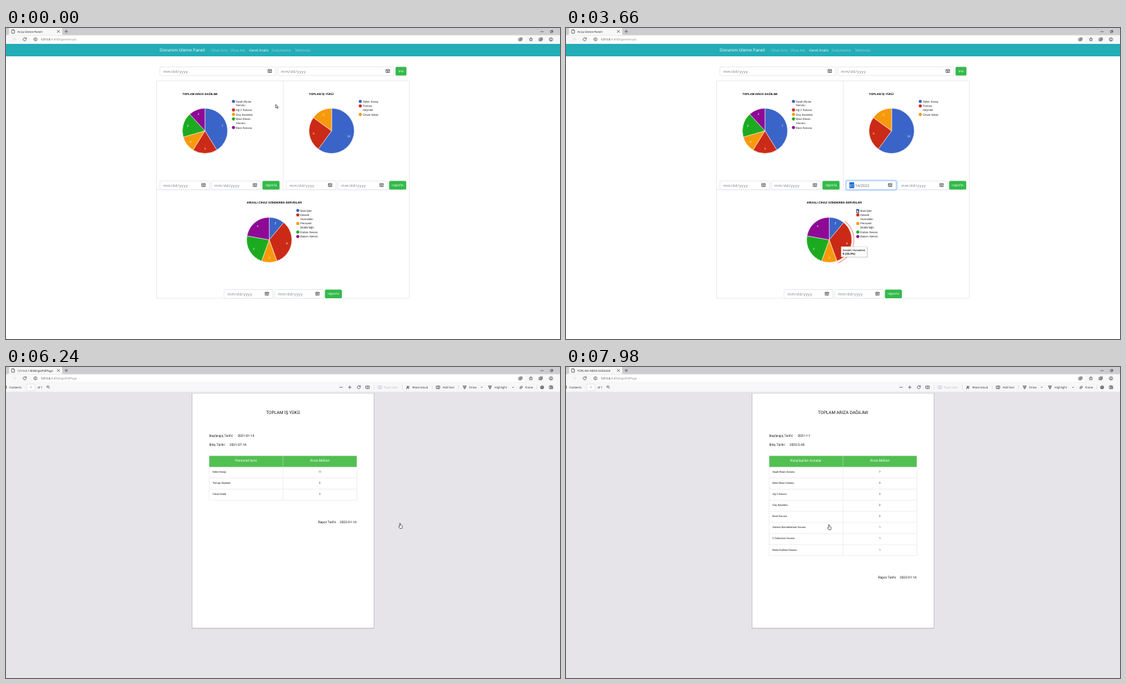
An HTML page for the animation above (8 s loop, 800x450 px).

```html
<!DOCTYPE html>
<html lang="tr">
<head>
<meta charset="utf-8">
<title>Arıza İzleme Paneli</title>
<style>
  html, body { margin: 0; height: 100%; overflow: hidden; background: #fff; }
  svg { display: block; width: 100vw; height: 100vh; text-rendering: geometricPrecision; }
  .ui { font-family: "Open Sans", "Noto Sans", sans-serif; }
  .chart { font-family: "Liberation Sans", Arial, sans-serif; }
  .doc { font-family: Roboto, sans-serif; }
  .ic { fill: none; stroke: #444; stroke-width: .7; stroke-linecap: round; stroke-linejoin: round; }
</style>
</head>
<body>
<svg id="stage" viewBox="0 0 800 450"></svg>
<script>
const LOOP = 8000, STEP = 60;
const COLORS = ['#3a64c8', '#cb2a16', '#f8990d', '#1cab1f', '#8e0a95'];
const APP = 'Arıza İzleme Paneli', HOST = '127.0.0.1';
const STAFF = ['Selim Koray', 'Tuncay Seymen', 'Cevat Solak'];

const rect = (x, y, w, h, fill, extra = '') =>
  `<rect x="${x}" y="${y}" width="${w}" height="${h}" fill="${fill}" ${extra}/>`;
const text = (x, y, s, size, fill = '#222', extra = '') =>
  `<text x="${x}" y="${y}" font-size="${size}" fill="${fill}" ${extra}>${s}</text>`;
const mid = 'text-anchor="middle"', bold = 'font-weight="bold"';
const icon = (x, y, d, extra = '') =>
  `<path class="ic" transform="translate(${x} ${y})" d="${d}" ${extra}/>`;
const group = (cls, ...parts) => `<g class="${cls}">${parts.join('')}</g>`;

const ICON = {
  cross: 'M-1.7-1.7L1.7 1.7M1.7-1.7L-1.7 1.7',
  plus: 'M-2 0H2M0-2V2',
  minus: 'M-2 0H2',
  reload: 'M2-1.2A2.3 2.3 0 1 0 2.3.4M2.2-2.4V-1H.8',
  forward: 'M-2.3 0H2.3M.4-1.9L2.3 0L.4 1.9',
  info: 'M-2.3 0A2.3 2.3 0 1 1 2.3 0A2.3 2.3 0 1 1-2.3 0M0-.2V1.2M0-1.2V-1.1',
  file: 'M-1.8-2.5H.5L1.8-1.2V2.5H-1.8ZM.5-2.5V-1.2H1.8',
  square: 'M-1.5-1.5H1.5V1.5H-1.5Z',
  window: 'M-1.5-.8H.8V1.5H-1.5ZM-.6-1.6H1.6V.6',
  star: 'M0-2.4L.7-.8L2.4-.6L1.1.6L1.5 2.3L0 1.4L-1.5 2.3L-1.1.6L-2.4-.6L-.7-.8Z',
  box: 'M-2.2-1.2H1.2V2.2H-2.2ZM-1-2.3H2.3V1M-1.4.5H.4M-.5-.4V1.4',
  person: 'M-2.5 0A2.5 2.5 0 1 1 2.5 0A2.5 2.5 0 1 1-2.5 0M-1.5 1.8Q0-.2 1.5 1.8M-.6-.7H.6',
  search: 'M-1.9-.5A1.4 1.4 0 1 1 .9-.5A1.4 1.4 0 1 1-1.9-.5M.6.6L2 2',
  pages: 'M-2.3-1.8H2.3V1.8H-2.3ZM0-1.8V1.8',
  voice: 'M-2 2L-.5-2L1 2M-1.5.7H.5M1.3-1.8Q2.3-1 1.6 0',
  pen: 'M-2-2H2L0 2.2ZM-1-.2H1',
  eraser: 'M-2 .6L.4-2L2-.5L-.4 2H-1ZM-.9-.6L.7.8',
  down: 'M-.9-.4L0 .5L.9-.4',
  printer: 'M-1.3-.7V-2.2H1.3V-.7M-2.2-.7H2.2V1.2H-2.2ZM-1.2.4H1.2V2.2H-1.2Z',
  disk: 'M-2.1-2.1H1.5L2.1-1.5V2.1H-2.1ZM-1-2V-.8H1V-2M-1.2 2V.4H1.2V2',
  calendar: 'M-2.3-2.2H2.3V2.3H-2.3ZM-2.3-1.1H2.3M-1.2.1H0M-.9 1.1H1'
};

function pie(cx, cy, values) {
  const total = values.reduce((a, b) => a + b);
  const at = (v, r) => {
    const a = v / total * 2 * Math.PI;
    return [cx + r * Math.sin(a), cy - r * Math.cos(a)].map(n => n.toFixed(2));
  };
  let sum = 0, slices = '', labels = '';
  values.forEach((v, i) => {
    const [lx, ly] = at(sum + v / 2, 26);
    slices += `<path d="M${cx} ${cy}L${at(sum, 32.6)}A32.6 32.6 0 ${+(v > total / 2)} 1 ${at(sum + v, 32.6)}Z" ` +
      `fill="${COLORS[i]}" stroke="#fff" stroke-width=".5"/>`;
    labels += text(lx, +ly + 1.5, v, 4.15, '#fff', mid);
    sum += v;
  });
  return slices + labels;
}

// Items may hold a line break written as "|".
function legend(x, y, items) {
  return items.map((item, i) => {
    const lines = item.split('|');
    const out = `<circle cx="${x}" cy="${y}" r="2.3" fill="${COLORS[i]}"/>` +
      lines.map((s, k) => text(x + 3.6, y + 1.5 + k * 5.5, s, 4.15)).join('');
    y += lines.length > 1 ? 12.4 : 6.5;
    return out;
  }).join('');
}

const charts = group('chart',
  text(254.7, 97, 'TOPLAM ARIZA DAĞILIMI', 4.15, '#000', bold),
  pie(287.3, 148.8, [7, 3, 2, 3, 2]),
  legend(328.5, 106.2, ['Siyah Ekran|Sorunu', 'Ağ 2 Sorunu', 'Güç Kesintisi', 'Mavi Ekran|Sorunu', 'Boot Sorunu']),
  text(437.6, 97, 'TOPLAM İŞ YÜKÜ', 4.15, '#000', bold),
  pie(470.2, 148.8, [12, 5, 3]),
  legend(511.6, 106.2, [STAFF[0], STAFF[1].replace(' ', '|'), STAFF[2]]),
  text(347.4, 254.4, 'ARIZALI CİHAZ GÖNDEREN SERVİSLER', 4.15, '#000', bold),
  pie(380.1, 306.5, [2, 6, 2, 4, 4]),
  legend(421.4, 264, ['Mali İşler', 'Destek|Hizmetleri', 'Personel|Müdürlüğü', 'Emlak Servisi', 'Bakım Servisi']));

const tooltip = group('chart',
  '<path d="M402.9 279.3A35.5 35.5 0 0 1 392.2 339.9" fill="none" stroke="#cb2a16" stroke-opacity=".35" stroke-width="1.6"/>',
  rect(398, 317.2, 38, 15, '#000', 'opacity=".15"'),
  rect(397.3, 316.3, 37.5, 14.8, '#fff', 'stroke="#ccc" stroke-width=".5"'),
  text(399.6, 322.6, 'Destek Hizmetleri', 4.15, '#000'),
  text(399.6, 328.2, '6 (33.3%)', 4.15, '#000', bold));

const frame = rect(0, 41, 800, 409, '#fff') + rect(0, 23, 800, 18, '#24adb7') +
  '<path d="M217.5 76.5H582.5V391H217.5ZM217.5 234H582.5M400.3 76.5V234" fill="none" stroke="#e2e3e6" stroke-width=".7"/>' +
  text(222, 34.4, 'Donanım İzleme Paneli', 6.1, '#fff') +
  [[296, 'Cihaz Giriş'], [324, 'Cihaz Ara'], [351, 'Genel Analiz'], [384, 'Dokümanlar'], [417, 'Telefonlar']]
    .map(([x, s]) => text(x, 33.8, s, 4.9, '#fff', x === 351 ? '' : 'opacity=".55"')).join('');

const BUTTONS = [
  [562.5, 56.2, 15.8, 'ara'], [370.3, 221.2, 24.7, 'raporla'],
  [553.2, 221.2, 24.7, 'raporla'], [460.5, 378.5, 24.5, 'raporla']
];
const BTN_H = 12.6;

function dateInput(x, y, w, value, focus) {
  const ring = focus ? rect(x - .8, y - .8, w + 1.6, 14.2, 'none', 'rx="2" stroke="#0d6efd" stroke-opacity=".25" stroke-width="1.6"') : '';
  let body = value
    ? text(x + 4.7, y + 8.3, value, 5.4, '#5c636b')
    : text(x + 4.7, y + 8.3, 'mm/dd/yyyy', 5.4, '#70777f', 'letter-spacing=".45"');
  if (focus && value)
    body += rect(x + 4.4, y + 2, 6.8, 8.6, '#1a6fd0') + text(x + 4.7, y + 8.3, value.slice(0, 2), 5.4, '#fff');
  return ring + rect(x, y, w, BTN_H, '#fff', `rx="1.6" stroke="${focus ? '#86b7fe' : '#d5d9de'}" stroke-width=".6"`) +
    body + icon(x + w - 8.6, y + 6, ICON.calendar, 'stroke-width=".8"');
}

// Latest entry whose time has been reached.
const since = (t, steps) => steps.filter(s => s[0] <= t).pop()[1];

const FIRST = [[0, ''], [1860, '01/14/2022'], [2160, '12/14/2021'], [2880, '01/14/2022'], [3960, '01/14/2021']];
const SECOND = [[0, ''], [4920, '01/14/2022'], [5160, '01/14/2021'], [5340, '07/14/2021']];

const over = ([x, y], [bx, by, w]) => x >= bx && x <= bx + w && y >= by && y <= by + BTN_H;

function analysis(t, p) {
  const focus = since(t, [[0, ''], [300, 'top'], [1500, 'first'], [4500, 'second'], [5640, '']]);
  return group('ui', frame,
    dateInput(222.2, 56.2, 167.5, '', focus === 'top'),
    dateInput(392.5, 56.2, 167.6, ''),
    dateInput(222.2, 221.2, 71.8, ''),
    dateInput(296.4, 221.2, 71.8, ''),
    dateInput(404.8, 221.2, 72, since(t, FIRST), focus === 'first'),
    dateInput(479.3, 221.2, 71.8, since(t, SECOND), focus === 'second'),
    dateInput(315, 378.5, 70.5, ''),
    dateInput(388, 378.5, 70.5, ''),
    BUTTONS.map(b => rect(b[0], b[1], b[2], BTN_H, over(p, b) ? '#23903a' : '#34b94b', 'rx="1.6"') +
      text(b[0] + b[2] / 2, b[1] + 7.9, b[3], 4.9, '#fff', mid)).join('')) +
    (t >= 7320 && t < 7440 ? '' : charts) + (t >= 2640 && t < 3840 ? tooltip : '');
}

function report(title, from, to, head, rows) {
  const top = 128.6, rowH = 16.05, end = top + rowH * (rows.length + 1);
  const cells = rows.map(([name, n], i) => {
    const y = top + rowH * (i + 1);
    return text(298.2, y + 8.5, name, 3.75, '#111') + text(453, y + 8.5, n, 3.75, '#111', mid) +
      `<path d="M293.3 ${y + rowH}H506.7" stroke="#ddd" stroke-width=".5"/>`;
  }).join('');
  return rect(0, 36, 800, 414, '#e6e4e8') + rect(268.2, 38, 263.8, 340.8, '#c5c3c8') + rect(269.2, 38.4, 261.8, 339, '#fff') +
    group('doc', text(400, 67.8, title, 6.3, '#111', mid),
      text(293.5, 100.7, 'Başlangıç Tarihi:', 4.75, '#111'), text(334.4, 100.7, from, 4.75, '#111'),
      text(293.5, 113.5, 'Bitiş Tarihi:', 4.75, '#111'), text(323, 113.5, to, 4.75, '#111'),
      rect(293.3, top, 213.4, rowH, '#52bf52'),
      text(346.5, 137.1, head, 5.1, '#fff', mid), text(453.2, 137.1, 'Arıza Miktarı', 5.1, '#fff', mid), cells,
      `<path d="M293.3 ${top}V${end}M400 ${top}V${end}M506.7 ${top}V${end}" stroke="#ddd" stroke-width=".5"/>`,
      text(450.8, end + 33, 'Rapor Tarihi:', 4.75, '#111'), text(482, end + 33, '2022-01-14', 4.75, '#111'));
}

const tool = (x, y, name, s, tx, color = '#333') =>
  icon(x, y, ICON[name], `style="stroke:${color}"`) + text(tx, y + 1.6, s, 4.3, color);

const pdfBar = group('ui', rect(0, 23, 800, 13.2, '#f7f6f8'), rect(0, 35.9, 800, .5, '#d5d3d8'),
  rect(0, 27, .8, 4.5, '#555'),
  text(4.8, 31, 'Contents', 4.2), rect(30, 24.6, 12, 9.8, '#fff', 'rx="1" stroke="#ccc" stroke-width=".5"'),
  text(36, 31, '1', 4.2, '#222', mid), text(45.4, 31, 'of 1', 4.2),
  icon(61, 29, ICON.search), icon(484, 29.3, ICON.minus), icon(496.4, 29.3, ICON.plus),
  icon(509.5, 29.3, ICON.reload, 'stroke-width=".9"'), icon(522.3, 29.3, ICON.pages),
  [531.5, 572, 615, 653, 690.5, 736.5, 766].map((x, i) => i === 4 || i === 5 ? '' : rect(x, 26, .5, 6.5, '#ccc')).join(''),
  tool(540, 29.4, 'pages', 'Page view', 545.5, '#c3c1c6'), tool(580.5, 29.4, 'voice', 'Read aloud', 586.8),
  tool(624, 29.4, 'pages', 'Add text', 630.6), tool(662.5, 29.4, 'pen', 'Draw', 669), icon(687, 29.4, ICON.down),
  tool(699, 29.4, 'pen', 'Highlight', 705.5), icon(732, 29.4, ICON.down), tool(744, 29.4, 'eraser', 'Erase', 750),
  icon(774.3, 29.3, ICON.printer), icon(787.3, 29.3, ICON.disk));

const reports = ['',
  pdfBar + report('TOPLAM İŞ YÜKÜ', '2021-01-14', '2021-07-14', 'Personel İsmi',
    STAFF.map((name, i) => [name, [11, 5, 3][i]])),
  pdfBar + report('TOPLAM ARIZA DAĞILIMI', '2021-1-1', '2022-5-30', 'Karşılaşılan Arızalar', [
    ['Siyah Ekran Sorunu', 7], ['Mavi Ekran Sorunu', 3], ['Ağ 2 Sorunu', 3], ['Güç Kesintisi', 2], ['Boot Sorunu', 2],
    ['Sistem Güncellemesi Sorunu', 1], ['C Sürücüsü Sorunu', 1], ['Baskı Kalitesi Sorunu', 1]])
];

function browser(t) {
  const path = since(t, [[0, 'genelanaliz'], [6060, 'getPdfPage'], [7080, 'genelanaliz'], [7740, 'getPdfPage']]);
  const title = since(t, [[0, APP], [6060, `${HOST}:8000/getPdfPage`], [6300, 'TOPLAM İŞ YÜKÜ'], [7080, APP],
    [7740, `${HOST}:8000/getPdfPage`], [7980, 'TOPLAM ARIZA DAĞILIMI']]);
  const loading = t >= 5940 && t < 6060 || t >= 7080 && t < 7440;
  const canForward = t >= 7080 && t < 7740;
  return group('ui', rect(0, 0, 800, 23, '#f7f7f8'), rect(0, 0, 800, 10.4, '#cdcdd0'),
    '<path d="M2 10.4Q4.5 10.4 4.5 8V0H81V8Q81 10.4 83.5 10.4Z" fill="#f7f7f8"/>',
    loading ? '' : icon(10.4, 5, ICON.file), text(16.4, 6.7, title, 4.15),
    icon(75.7, 5, ICON.cross, 'transform-origin="0 0"'), icon(87, 5, ICON.plus),
    icon(774, 5.2, ICON.minus), icon(788, 5.2, ICON.window),
    rect(35.5, 11.8, 715, 9.4, '#fff', 'rx="4.7"'),
    icon(12.3, 16.3, ICON.forward, `style="stroke:${canForward ? '#333' : '#dcdcde'}"`),
    icon(27, 16.3, loading ? ICON.cross : ICON.reload), icon(42.6, 16.3, ICON.info),
    text(50, 17.9, `${HOST}<tspan fill="#858589">:8000/${path}</tspan>`, 4.2),
    icon(743, 16.4, ICON.box), icon(758, 16.4, ICON.star), icon(772.3, 16.4, ICON.box), icon(787, 16.4, ICON.person));
}

// Pointer stops: time, x, y of the tip.
const STOPS = [
  [0, 389.5, 110.5], [240, 310, 62], [420, 310, 62], [600, 566, 62], [660, 570, 62], [840, 572, 224],
  [900, 572, 222], [1200, 657, 160], [1500, 468, 227], [1680, 470, 294],
  [2040, 553, 262], [2340, 469, 242], [2400, 469, 242], [2520, 438, 258], [2640, 428, 268],
  [3000, 436, 274], [3360, 421, 266], [3600, 419.6, 262.5], [3660, 419.6, 262.5], [3840, 440, 260],
  [4200, 570, 255], [4500, 543, 227], [4620, 543, 227], [5040, 520, 283], [5400, 560, 262],
  [5640, 585, 203], [5880, 569, 225.7], [6600, 569, 225.7], [7080, 589.5, 142.5], [7260, 589.5, 142.5],
  [7500, 379.6, 227.7], [8000, 379.6, 227.7]
];

function pointer(t) {
  const i = STOPS.findIndex(s => s[0] > t), [t0, x0, y0] = STOPS[i - 1], [t1, x1, y1] = STOPS[i];
  const u = (t - t0) / (t1 - t0), e = u * u * (3 - 2 * u);
  return [x0 + (x1 - x0) * e, y0 + (y1 - y0) * e];
}

const ARROW = 'M0 0V5.2L1.2 4.1L2.1 6L3 5.6L2.1 3.8H3.7Z';
const HAND = 'M-.6.6Q0-.4.6.6V3L3 3.6Q3.7 3.9 3.5 4.8L2.8 7.8H-.3L-2 5.2Q-1.8 4.2-.6 5Z';

function cursor([x, y], hand) {
  return `<path transform="translate(${x.toFixed(2)} ${y.toFixed(2)})" d="${hand ? HAND : ARROW}" ` +
    'fill="#fff" stroke="#222" stroke-width=".65" stroke-linejoin="round"/>';
}

const stage = document.getElementById('stage');
let shown = '';

function draw(now) {
  const t = Math.floor(now % LOOP / STEP) * STEP;
  const p = pointer(t);
  const pdf = since(t, [[0, 0], [6240, 1], [7320, 0], [7920, 2]]);
  const hand = BUTTONS.some(b => over(p, b)) && !(pdf === 1 && t > 6600);
  const html = (pdf ? reports[pdf] : analysis(t, p)) + browser(t) + cursor(p, hand);
  if (html !== shown) stage.innerHTML = shown = html;
  requestAnimationFrame(draw);
}
draw(performance.now());
</script>
</body>
</html>
```
